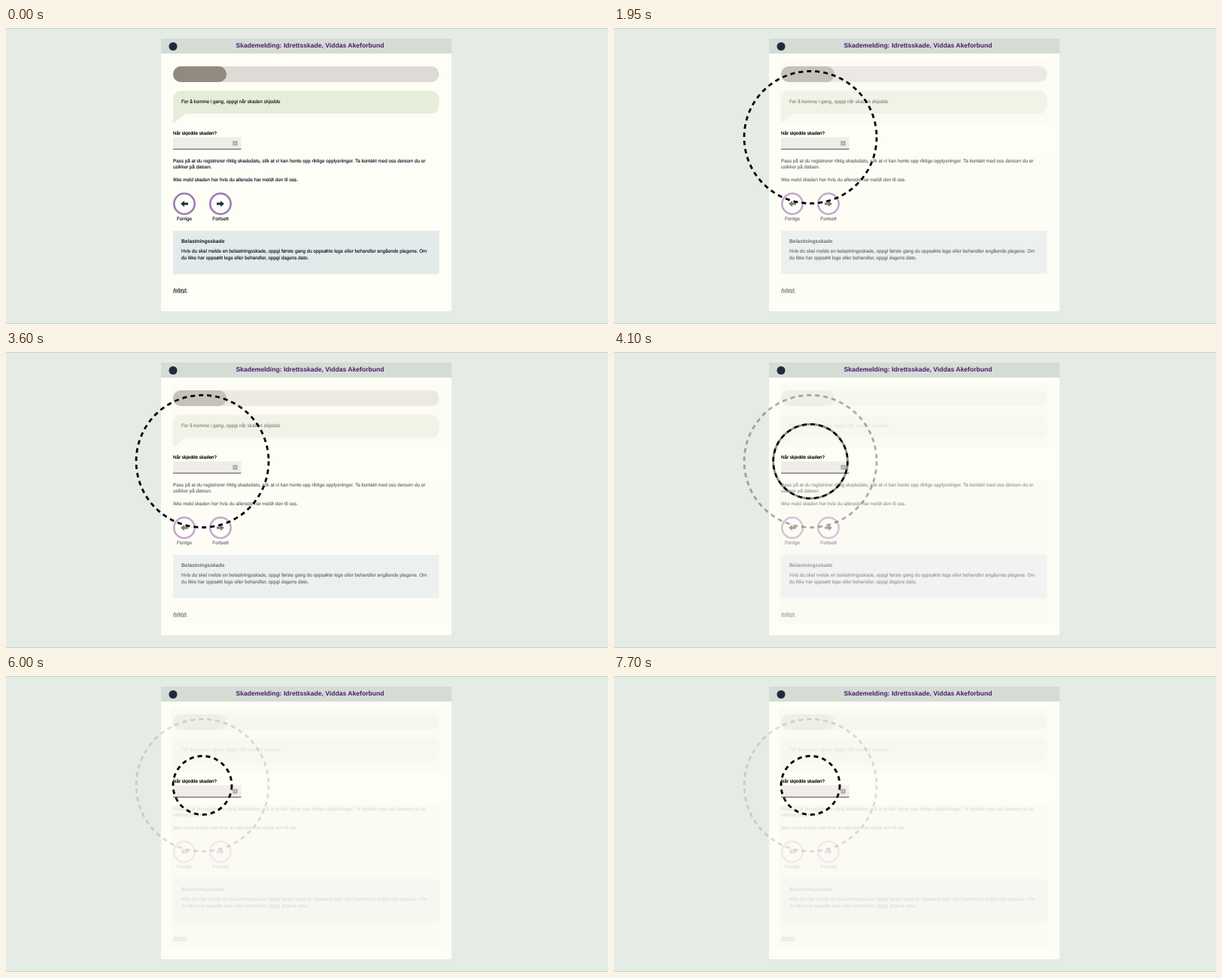
Animation, 800 px wide and 394 px high, one loop 7750 ms. Source, as an HTML page:

```html
<!DOCTYPE html>
<html lang="no">
<head>
<meta charset="utf-8">
<title>Skademelding</title>
<style>
  html, body { margin: 0; width: 100%; height: 100%; overflow: hidden; background: #e4ece5; }
  svg { display: block; width: 800px; height: 394px; }
  text {
    font: 6.32px "Liberation Sans", Arial, sans-serif;
    fill: #0d1520; stroke: #0d1520; stroke-width: .13px;
    text-rendering: geometricPrecision;
  }
  .title { font-size: 8.58px; font-weight: bold; fill: #4b1a6e; stroke: none; text-anchor: middle; }
  .head { font-size: 6.75px; font-weight: bold; stroke: none; }
  .label { font-size: 6.18px; fill: #000; stroke: #000; stroke-width: .2px; }
  .mid { text-anchor: middle; }
  .ring { fill: none; stroke: #000; stroke-width: 2.8px; stroke-dasharray: 6 5.06; }
  .veil { fill: #fbfaf3; }
</style>
</head>
<body>
<svg viewBox="0 0 800 394">
  <rect width="800" height="394" fill="#e4ece5"/>
  <path d="M0 .5H800M0 393.5H800" stroke="#c8cfca"/>
  <rect x="206" y="14" width="386" height="363" fill="#fdfef5"/>
  <rect x="206" y="14" width="386" height="20" fill="#d5dcd5"/>
  <circle cx="222" cy="24.5" r="5.5" fill="#1f2d3a"/>
  <text class="title" x="404" y="26.3">Skademelding: Idrettsskade, Viddas Akeforbund</text>

  <!-- progress and speech bubble -->
  <rect x="222" y="51" width="353.5" height="21" rx="10.5" fill="#dedad6"/>
  <rect x="222" y="51" width="71" height="21" rx="10.5" fill="#918a80"/>
  <path d="M222 94a10.5 10.5 0 0 1 10.5-10.5H565a10.5 10.5 0 0 1 10.5 10.5v9.5a10.5 10.5 0 0 1-10.5 10.5H239L222 127Z" fill="#e6eed9"/>
  <text x="233" y="100.3">For å komme i gang, oppgi når skaden skjedde</text>

  <!-- date field -->
  <text class="label" x="222" y="142">Når skjedde skaden?</text>
  <rect x="222" y="145.5" width="90.5" height="16" fill="#f0ede8"/>
  <path d="M222 161.2H312.5" stroke="#4a4a4a"/>
  <rect x="302" y="151" width="5" height="5" fill="#c4c2be" stroke="#8b8a87" stroke-width=".8"/>

  <text x="222" y="179">Pass på at du registrerer riktig skadedato, slik at vi kan hente opp riktige opplysninger. Ta kontakt med oss dersom du er</text>
  <text x="222" y="187.4">usikker på datoen.</text>
  <text x="222" y="204.4">Ikke meld skaden her hvis du allerede har meldt den til oss.</text>

  <g fill="#fefefa" stroke="#9b7bb8" stroke-width="2.6">
    <circle cx="237" cy="234" r="13.7"/>
    <circle cx="285" cy="234" r="13.7"/>
  </g>
  <path d="M232 234l5-4v2.4h5v3.2h-5v2.4ZM290 234l-5-4v2.4h-5v3.2h5v2.4Z" fill="#1f2d3a"/>
  <text class="mid" x="237" y="256">Forrige</text>
  <text class="mid" x="285" y="256">Fortsett</text>

  <rect x="222" y="270" width="353.5" height="57.5" fill="#e2eaea"/>
  <text class="head" x="233" y="286.3">Belastningsskade</text>
  <text x="233" y="299.4">Hvis du skal melde en belastningsskade, oppgi første gang du oppsøkte lege eller behandler angående plagene. Om</text>
  <text x="233" y="308.2">du ikke har oppsøkt lege eller behandler, oppgi dagens dato.</text>
  <text x="222" y="351">Avbryt</text>
  <path d="M222 352H241" stroke="#0d1520" stroke-width=".7"/>

  <rect id="veilTop" class="veil" x="219" y="42" width="359.5" height="85"/>
  <rect id="veilLow" class="veil" x="219" y="171" width="359.5" height="190"/>
  <circle id="outer" class="ring" cx="261" cy="145.5" r="88"/>
  <circle id="ghost" class="ring" cx="261" cy="145.5" stroke-dashoffset="5.5"/>
  <circle id="inner" class="ring" cx="261" cy="145.5"/>
</svg>
<script>
const LOOP = 7750, FADE = 250;
const $ = id => document.getElementById(id);
const [veilTop, veilLow, outer, ghost, inner] =
  ['veilTop', 'veilLow', 'outer', 'ghost', 'inner'].map($);
const progress = (t, start) => Math.min(1, Math.max(0, (t - start) / FADE));
const easeOut = p => 1 - (1 - p) ** 3;
const show = (el, alpha) => el.setAttribute('opacity', alpha);
const begin = performance.now();

function draw() {
  const t = (performance.now() - begin) % LOOP;
  const p = progress(t, 1650), q = progress(t, 4000);
  const first = easeOut(p), second = easeOut(q);

  show(veilTop, .5 * first + .4 * Math.min(1, q * 2.5));
  show(veilLow, .38 * first + .5 * q);
  show(outer, first - .87 * second);

  // the inner ring shrinks out of the outer one
  const r = 88 - 49 * second;
  inner.setAttribute('r', r);
  ghost.setAttribute('r', r);
  show(inner, q > 0 ? 1 : 0);
  show(ghost, q > 0 ? Math.min(.5, 2 * (1 - second)) : 0);
  requestAnimationFrame(draw);
}
draw();
</script>
</body>
</html>
```
